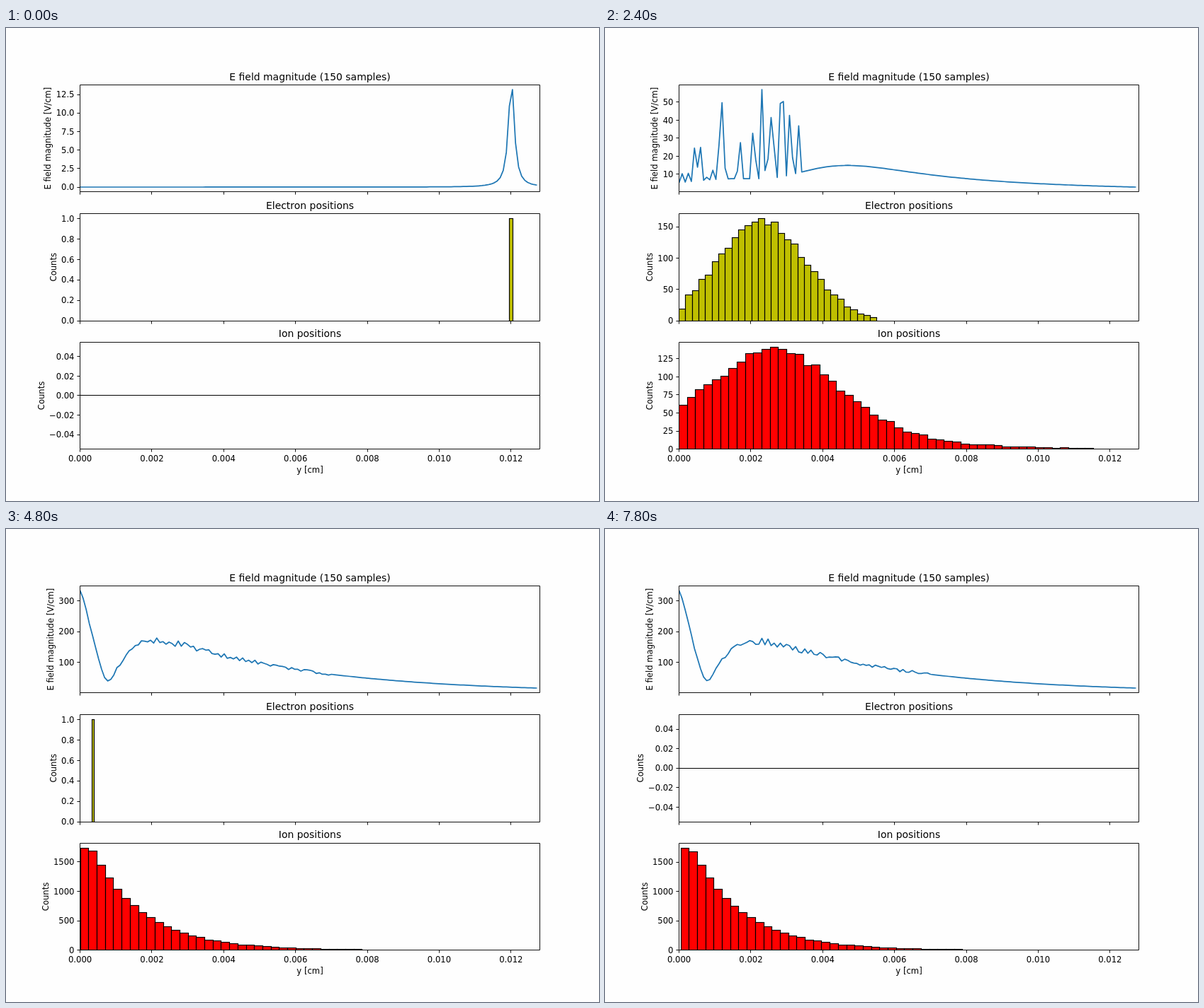
Animation of 837x669 px, one loop 8000 ms. Source, as an HTML page:

```html
<!DOCTYPE html>
<html lang="en">
<head>
<meta charset="utf-8">
<title>Electron avalanche</title>
<style>
  html, body { margin: 0; width: 100%; height: 100%; overflow: hidden; background: #fefefe; }
  svg { display: block; width: 837px; height: 669px; font: 11.62px "DejaVu Sans", sans-serif; }
  .title { font-size: 13.95px; text-anchor: middle; }
  .mid { text-anchor: middle; }
  .end { text-anchor: end; }
  .axis { fill: none; stroke: #000; stroke-width: .93; }
  .bar { stroke: #000; stroke-width: 1.16; }
  .line { fill: none; stroke: #1f77b4; stroke-width: 1.74; stroke-linejoin: round; }
</style>
</head>
<body>
<svg id="stage" viewBox="0 0 837 669"></svg>
<script>
const FONT = 11.62, LEFT = 104.6, RIGHT = 753.3, HEIGHT = 151.7;
const TOPS = [80.2, 262.35, 444.1];
const FRAME = 200, FRAMES = 40, SAMPLES = 150, SAMPLE_W = 4.328;
const ELECTRON_BINS = 30, ION_BINS = 50;

const snap = v => Math.round(v - .5) + .5;
const clamp = (v, lo, hi) => Math.max(lo, Math.min(hi, v));
const sum = list => list.reduce((a, b) => a + b, 0);
const series = (n, fn) => Array.from({ length: n }, (_, i) => fn(i));

function random(seed) {
  let s = seed * 7919 + 13;
  const next = () => (s = s * 16807 % 2147483647) / 2147483647;
  next();
  return next;
}

// Random values every `grid` samples, eased in between.
function smoothNoise(seed, grid) {
  const knots = series(SAMPLES + 2, random(seed));
  return i => {
    const k = Math.floor(i / grid), u = i / grid - k;
    return knots[k] + (knots[k + 1] - knots[k]) * u * u * (3 - 2 * u);
  };
}

// The electron swarm drifts left in a widening bell, in pixels.
function swarm(t) {
  const mean = 713.5 - 53 * t + t * t;
  const sigma = Math.min(5.5 * t, 62);
  const reach = (2.2 + .035 * t) * sigma;
  const size = Math.exp(Math.min(1.35 * t ** .71, 8.7, 28 - t));
  return { mean, sigma, size, lo: Math.max(LEFT, mean - reach), hi: mean + reach };
}

function histogram(lo, hi, bins, density, seed) {
  const w = (hi - lo) / bins, rnd = random(seed);
  const n = series(bins, i => {
    const expected = density(lo + (i + .5) * w) * w;
    return Math.max(0, Math.floor(expected + Math.sqrt(expected) * (rnd() - .5) + rnd()));
  });
  return { lo, w, n };
}

function electrons(t) {
  if (t === 0) return { lo: 710.7, w: 5, n: [1] };
  if (t >= 25) return null;
  const { mean, sigma, size, lo, hi } = swarm(t);
  const density = x => size / (sigma * Math.sqrt(2 * Math.PI))
    * Math.exp(-(((x - mean) / sigma) ** 2) / 2)
    * Math.min(1, (x - LEFT + 4) / 14);
  return histogram(lo, hi, ELECTRON_BINS, density, t);
}

// Ions fill an exponential profile from the right as the front passes.
function ions(t) {
  if (t === 0) return null;
  const { sigma, lo } = swarm(t);
  const drift = Math.max(0, t - 20) * .13, edge = LEFT + drift;
  const front = 700 - 37 * t;
  const density = x => Math.min(147, 184 * Math.exp((edge - x) / 73))
    / (1 + Math.exp((front - x) / (.7 * sigma)));
  return histogram(Math.max(edge, lo), 689.5 + drift, ION_BINS, density, 5);
}

const peaks = [[0, 13], [4, 2.5], [8, 31], [12, 57], [20, 330]];
function peakAt(t) {
  const k = clamp(peaks.findIndex(p => p[0] >= t), 1, peaks.length - 1);
  const [t0, a] = peaks[k - 1], [t1, b] = peaks[k];
  return a * (b / a) ** ((t - t0) / (t1 - t0));
}

// Lone charge: inverse square, softened at its centre.
const pointField = i => 350 / ((LEFT + i * SAMPLE_W - 713.3) ** 2 + 24.2);

// Wide wings around the swarm, with random spikes inside it.
function swarmField(t) {
  const centre = (swarm(t).mean - LEFT) / SAMPLE_W;
  const amp = 1.7 * Math.exp(.336 * (Math.min(t, 12) - 4));
  const noise = smoothNoise(t + 60, Math.max(1, Math.round(7 - t / 2)));
  const envelope = i => Math.exp(-(((i - centre) / (4 + 1.6 * t)) ** 2));
  const spikes = series(SAMPLES, i => envelope(i) * noise(i) ** 3);
  const scale = peakAt(t) / Math.max(...spikes);
  return series(SAMPLES, i => {
    const u = i - centre, width = u < 0 ? 16 : 20 + 2 * t;
    return Math.max(amp / (1 + (u / width) ** 2) * (1 - .7 * envelope(i)), spikes[i] * scale);
  });
}

// Ion cloud against the charge at the left wall; they cancel near sample 9.
function settledField(t) {
  const rnd = random(t + 90);
  return series(SAMPLES, i => {
    const cloud = 310 * Math.exp(-i / 50), wall = 640 * Math.exp(-((i / 9.8) ** 1.3));
    const rough = i < 82 ? .13 * Math.min(1, i / 15) : 0;
    return Math.hypot(cloud - wall, .15 * cloud) * (1 + rough * (rnd() - .5));
  });
}

function field(t) {
  if (t === 0) return series(SAMPLES, pointField);
  if (t >= 20) return settledField(t);
  const u = clamp((t - 12) / 8, 0, 1), settled = settledField(t);
  return swarmField(t).map((e, i) => e ** (1 - u) * settled[i] ** u);
}

function ticks(lo, hi) {
  const raw = (hi - lo) / 6, mag = 10 ** Math.floor(Math.log10(raw));
  const step = [1, 2, 2.5, 5, 10].map(m => m * mag).find(s => s >= raw - 1e-9);
  const digits = [0, 1, 2, 3].find(d => Math.abs(step * 10 ** d - Math.round(step * 10 ** d)) < 1e-6);
  const list = [];
  for (let i = Math.ceil(lo / step); i * step <= hi; i++)
    list.push([i * step, (i * step).toFixed(digits).replace("-", "\u2212")]);
  return list;
}

const glyphWidth = c => c === "." ? .318 : c === "\u2212" ? .838 : .636;
const textWidth = s => FONT * sum([...s].map(glyphWidth));
const text = (x, y, s, cls, extra = "") => `<text x="${x}" y="${y}" class="${cls}" ${extra}>${s}</text>`;
const path = (d, cls) => `<path class="${cls}" d="${d}"/>`;

function panel(row, title, label, lo, hi, draw) {
  const top = TOPS[row], bottom = top + HEIGHT;
  const yOf = v => bottom - (v - lo) / (hi - lo) * HEIGHT;
  let out = `<g clip-path="url(#clip${row})">${draw(yOf)}</g>`;
  let axes = `M${snap(LEFT)} ${snap(top)}H${snap(RIGHT)}V${snap(bottom)}H${snap(LEFT)}Z`;
  let widest = 0;
  for (const [v, s] of ticks(lo, hi)) {
    const y = yOf(v);
    axes += `M${snap(LEFT)} ${snap(y)}h-4.1`;
    out += text(96.5, Math.round(y + 4.2), s, "end");
    widest = Math.max(widest, textWidth(s));
  }
  for (let i = 0; i < 7; i++) {
    const x = LEFT + i * 101.37;
    axes += `M${snap(x)} ${snap(bottom)}v4.1`;
    if (row === 2) out += text(x, 613, (i * .002).toFixed(3), "mid");
  }
  const lx = 96.5 - widest - 7.35, ly = top + HEIGHT / 2;
  out += text(lx, ly, label, "mid", `transform="rotate(-90 ${lx} ${ly})"`);
  return out + path(axes, "axis") + text(429, Math.round(top - 6.7), title, "title");
}

function fieldPanel(t) {
  const v = field(t), min = Math.min(...v), max = Math.max(...v), pad = (max - min) * .05;
  return panel(0, "E field magnitude (150 samples)", "E field magnitude [V/cm]", min - pad, max + pad,
    yOf => path("M" + v.map((e, i) =>
      `${(LEFT + i * SAMPLE_W).toFixed(2)} ${yOf(e).toFixed(2)}`).join("L"), "line"));
}

function histPanel(row, title, hist, color) {
  const max = hist ? Math.max(...hist.n) : 0;
  if (!max) return panel(row, title, "Counts", -.055, .055,
    yOf => path(`M${LEFT} ${snap(yOf(0))}H${RIGHT}`, "bar"));
  return panel(row, title, "Counts", 0, max * 1.05, yOf => hist.n.map((c, i) => {
    if (!c) return "";
    const x = snap(hist.lo + i * hist.w), x2 = snap(hist.lo + (i + 1) * hist.w);
    const y = snap(yOf(c)), base = snap(yOf(0));
    return `<rect class="bar" fill="${color}" x="${x}" y="${y}" width="${x2 - x}" height="${base - y}"/>`;
  }).join(""));
}

const stage = document.getElementById("stage");
const clips = TOPS.map((y, i) => `<clipPath id="clip${i}"><rect x="${LEFT}" y="${y}"
  width="${RIGHT - LEFT}" height="${HEIGHT}"/></clipPath>`).join("");
let shown = -1;

function tick(now) {
  const t = Math.floor(now / FRAME) % FRAMES;
  if (t !== shown) {
    shown = t;
    stage.innerHTML = `<defs>${clips}</defs>` + fieldPanel(t) +
      histPanel(1, "Electron positions", electrons(t), "#bfbf00") +
      histPanel(2, "Ion positions", ions(t), "#f00") +
      text(429, 629, "y [cm]", "mid");
  }
  requestAnimationFrame(tick);
}
requestAnimationFrame(tick);
</script>
</body>
</html>
```
